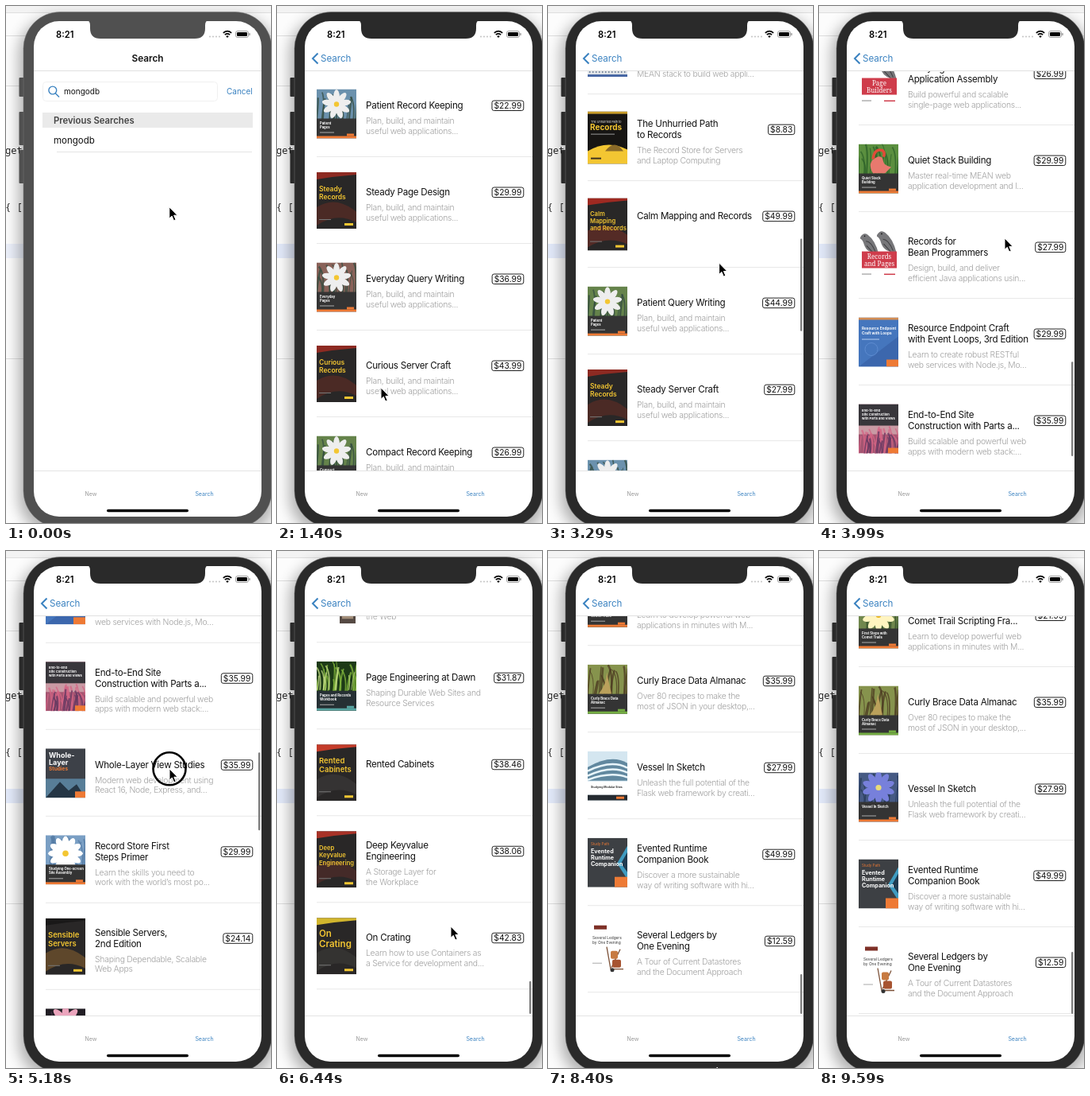
These frames come from a looping animation (334x650 px, 9660 ms). An HTML page:

```html
<!DOCTYPE html>
<html lang="en">
<head>
<meta charset="utf-8">
<title>Book search</title>
<style>
html, body { margin: 0; width: 100%; height: 100%; overflow: hidden; background: #fff; }
body > svg { display: block; width: 100vw; height: 100vh; }
text { font-family: Inter, "Open Sans", sans-serif; white-space: pre; }
.mono { font-family: "Noto Sans Mono", "DejaVu Sans Mono", monospace; }
.title { font-size: 11.6px; letter-spacing: -.26px; fill: #111; }
.sub { font-size: 10.4px; letter-spacing: -.25px; font-weight: 300; fill: #a0a0a0; }
</style>
</head>
<body>
<svg id="stage" viewBox="0 0 334 650"></svg>
<script>
const LOOP = 9660, ROW = 109, BLUE = '#3a82c0', GOLD = '#f3c632', ORANGE = '#ee7a35';

const rnd = k => { const v = Math.sin(k * 12.9898) * 43758.5453; return v - Math.floor(v); };
const text = (x, y, s, size, fill, more = '') =>
  `<text x="${x}" y="${y}" font-size="${size}" fill="${fill}" ${more}>${s}</text>`;
const rect = (x, y, w, h, fill, more = '') =>
  `<rect x="${x}" y="${y}" width="${w}" height="${h}" fill="${fill}" ${more}/>`;
const path = (d, fill, more = '') => `<path d="${d}" fill="${fill}" ${more}/>`;
const oval = (x, y, rx, ry, fill, more = '') =>
  `<ellipse cx="${x}" cy="${y}" rx="${rx}" ry="${ry}" fill="${fill}" ${more}/>`;
const lines = (s, x, y, step, size, fill, more) =>
  s.split('|').map((l, i) => text(x, y + i * step, l, size, fill, more)).join('');
const rule = (x1, x2, y, color) => rect(x1, y, x2 - x1, 1, color);
const bold = 'font-weight="700"';

// Cover artwork, each 50 wide
const box = (h, art) => `<svg x="50" y="${54.5 - h / 2}" width="50" height="${h}">${art}</svg>`;

function blades(seed, color, n, y, h) {
  let out = '';
  for (let i = 0; i < n; i++) {
    const x = rnd(seed + i) * 50, top = y + rnd(seed + i * 3 + 1) * h * .6;
    out += `<path d="M${x} ${y + h}Q${x + 2} ${top + 8} ${x + rnd(seed + i * 7) * 12 - 6} ${top}" ` +
      `stroke="${color}" stroke-width="${1 + rnd(i) * 1.6}" fill="none" opacity=".75"/>`;
  }
  return out;
}

function petals(x, y, r, n, color, core) {
  let out = '';
  for (let i = 0; i < n; i++)
    out += oval(x, y - r * .6, r * .24, r * .55, color, `transform="rotate(${i * 360 / n} ${x} ${y})"`);
  return out + oval(x, y, r * .2, r * .2, core);
}

const photo = (sky, grass, bloom, title, strip = ORANGE, band = '#343434') => box(62,
  rect(0, 0, 50, 62, sky) + blades(title.length, grass, 18, 0, 38) + bloom +
  rect(0, 37, 50, 25, band) + lines(title, 4, 44, 5, 4.2, '#fff', bold) +
  rect(4, 54, 18, 1, '#aaa') + rect(0, 59, 50, 3, strip) + rect(38, 56, 9, 3, strip));

const night = (h, title, size, top = '#8d2a22', glow = '#5a2c24') => box(h,
  rect(0, 0, 50, h, '#292727') +
  path(`M0 ${h * .62}Q24 ${h * .4} 50 ${h * .7}V${h - 8}Q25 ${h * .7} 0 ${h - 4}Z`, glow, 'opacity=".7"') +
  path('M0 0H50V3Q24 5 0 9Z', top) +
  lines(title, 3, h * .34, size + 1.5, size, GOLD, 'font-weight="600"') +
  rect(3, h - 12, 15, 1, '#777') + rect(35, h - 7, 11, 3, GOLD));

const bird = (x, y, s) => `<g transform="translate(${x} ${y}) scale(${s})" fill="#77777a">` +
  path('M0 3Q5-6 12-1Q24 8 29 29Q10 28 6 14Q4 7 0 5Z', '#77777a') +
  path('M9 9Q17 9 24 26M10 16L20 27M16 28V34M21 28V34', 'none', 'stroke="#3f3f42" stroke-width="1.3"') +
  oval(7, 1, 1, 1, '#111') + '</g>';

const animal = (title, two) => box(66, rect(0, 0, 50, 66, '#fff') + bird(23, 5, .85) +
  (two ? bird(2, 8, .8) : '') + rect(4, 28, 44, 21, '#cf3c4b') +
  lines(title, 26, 37, 9, 8, '#fff', 'text-anchor="middle" style="font-family:\'Noto Serif\',serif"') +
  rect(4, 56, 12, 1, '#888') + rect(32, 56, 14, 1.5, '#cf3c4b'));

const covers = {
  5: photo('#3b3330', '#70472a', '', 'Site|Workbench', ORANGE, '#2c2725'),
  6: night(71, 'Sensible|Records', 9, '#6d3028', '#6b4638'),
  7: box(65, rect(0, 0, 50, 65, '#f8f8f8') + rect(0, 0, 50, 12, '#596fae') + rect(4, 5, 24, 1.5, '#c8d2ee') +
    lines('Layers, Modules|and Pages for|Site Building', 4, 29, 6, 5.2, '#445') +
    rect(0, 44, 50, 21, '#8f9fb6') + path('M0 54L16 48H34L50 54V62H0Z', '#e0e4e8') +
    Array.from({ length: 12 }, (_, i) => rect(2 + i * 4, 54, 1.4, 6, '#77869a')).join('') +
    rect(0, 62, 50, 3, '#4666a4')),
  8: box(66, rect(0, 0, 50, 66, '#171513') + path('M0 50Q25 35 50 48V66H0Z', GOLD) +
    path('M22 50Q34 34 45 50Z', '#8a6a28') + rect(0, 0, 50, 3, '#c99d2a') +
    text(4, 14, 'The Unhurried Path to', 3.7, '#eee') +
    text(3, 23, 'Records', 10, GOLD, bold) + rect(4, 28, 30, 1, '#999') + rect(4, 58, 13, 2, '#3d3320')),
  9: night(66, 'Calm|Mapping|and Records', 7.6, '#9e2921', '#672d26'),
  14: animal('Page|Builders'),
  15: photo('#5b8f3f', '#2d6129',
    path('M18 37Q10 23 22 17Q30 13 31 22Q32 27 41 29L33 37Z', '#e8796e') +
    path('M18 19Q20 5 30 8Q34 12 31 16', 'none', 'stroke="#e14b38" stroke-width="3.5"'), 'Quiet Stack|Building'),
  16: animal('Records|and Pages', true),
  17: box(62, rect(0, 0, 50, 62, '#4576bd') + path('M0 62L50 24V62Z', '#3c67ad') +
    rect(0, 0, 50, 3, '#d48e55') + lines('Resource Endpoint|Craft with Loops', 4, 15, 6, 4.7, '#fff', bold) +
    rect(4, 27, 22, 1, '#b5cdf0') + oval(16, 40, 8, 8, 'none', 'stroke="#5d8bd0"') + rect(35, 53, 15, 9, ORANGE)),
  18: box(62, rect(0, 0, 50, 62, '#a45571') + rect(0, 26, 50, 12, '#c99aa4') +
    blades(8, '#d56585', 28, 28, 34) + blades(31, '#633960', 18, 33, 29) + rect(0, 0, 50, 27, '#38363b') +
    lines('End-to-End|Site Construction|with Parts and Views', 4, 9, 5, 4.1, '#fff', bold) + rect(37, 55, 13, 7, ORANGE)),
  19: box(62, rect(0, 0, 50, 62, '#3d4148') + lines('Whole-|Layer', 4, 12, 9, 9, '#fff', bold) +
    text(4, 28, 'Studies', 6.5, ORANGE, bold) + rect(0, 38, 50, 24, '#587e98') +
    path('M0 62L18 42L29 53L39 45L50 62Z', '#253645') + rect(37, 54, 13, 8, ORANGE)),
  20: photo('#7a9fc4', '#547ba5', petals(25, 23, 19, 12, '#fff', GOLD), 'Studying One-screen|Site Assembly'),
  21: night(71, 'Sensible|Servers', 9.5, '#191818', '#75552d'),
  22: photo('#211d24', '#493047', petals(25, 16, 18, 8, '#eba5bd', '#dc567d'), 'Record|Primer'),
  25: `<svg x="79" y="36" width="20" height="49">${rect(0, 0, 20, 49, '#554943') + rect(3, 39, 14, 4, '#a28e79')}</svg>`,
  26: photo('#1d3a17', '#83b83d', blades(55, '#c3dd85', 9, 4, 32), 'Pages and Records|Workbook', '#58a6a3', '#263034'),
  27: night(71, 'Rented|Cabinets', 9.5, '#c43c2a', '#3b3838'),
  28: night(71, 'Deep|Keyvalue|Engineering', 7.6, '#a83227', '#512c28'),
  29: night(71, 'On|Crating', 11.5, '#d1b52d', '#393835'),
  35: photo('#70874d', '#3c5730', petals(25, 20, 18, 10, '#fff4c0', '#eab622'), 'First Steps with|Comet Trails'),
  36: photo('#86934d', '#4c3b22', path('M14 37Q24 24 24 10L30 37Z', '#baa05b'), 'Curly Brace Data|Almanac', '#74ae43'),
  37: `<g id="stale">${box(62, rect(0, 0, 50, 62, '#d4e6f0') + path('M0 20Q30 3 50 15V37H0Z', '#61889f') +
    path('M0 25Q30 10 50 21M0 31Q30 17 50 27M0 36Q30 25 50 33', 'none', 'stroke="#e8f5fb" stroke-width="2.5"') +
    rect(0, 38, 50, 17, '#fff') + text(4, 46, 'Studying Modular Sites', 3.5, '#333', bold) +
    rect(0, 55, 50, 7, '#252b31') + rect(36, 57, 10, 3, ORANGE))}</g><g id="fresh">` +
    photo('#465a84', '#263956', petals(25, 19, 18, 10, '#7780db', '#e9db79'), 'Vessel In Sketch') + '</g>',
  38: box(62, rect(0, 0, 50, 62, '#3d4044') + path('M50 10L37 32L50 52Z', '#3e9bc0') + path('M50 18L42 32L50 43Z', '#203b50') +
    text(4, 9, 'Study Path', 4.5, ORANGE) + lines('Evented|Runtime|Companion', 4, 19, 8, 7.2, '#fff', bold) +
    rect(34, 49, 16, 13, ORANGE)),
  39: box(62, rect(0, 0, 50, 62, '#fff') + rect(8, 1, 16, 5, '#7e3027') +
    lines('Several Ledgers|by One Evening', 6, 18, 6, 4.8, '#333') + path('M24 28L29 56H45M30 54L41 31', 'none', 'stroke="#7b5037" stroke-width="1.3"') +
    rect(29, 33, 9, 10, '#c77a41', 'rx="2"') + rect(31, 44, 11, 10, '#a75431', 'rx="2"') + oval(31, 57, 2.5, 2.5, '#333') + rect(6, 48, 12, 1, '#aaa'))
};

const books = {
  5: ['Site Assembly|Workbench', 'Build an interactive and full-|featured web application from...', '39.99'],
  6: ['Document Almanac,|2nd Edition', 'Harness the latest features of|MongoDB 3 with this collectio...', '35.99'],
  7: ['Layered Servers and|Modular Browser Assembly,...', 'The definitive guide to using the|MEAN stack to build web appli...', '33.16'],
  8: ['The Unhurried Path|to Records', 'The Record Store for Servers|and Laptop Computing', '8.83'],
  9: ['Calm Mapping and Records', '', '49.99'],
  14: ['Studying One-screen Site|Application Assembly', 'Build powerful and scalable|single-page web applications...', '26.99'],
  15: ['Quiet Stack Building', 'Master real-time MEAN web|application development and l...', '29.99'],
  16: ['Records for|Bean Programmers', 'Design, build, and deliver|efficient Java applications usin...', '27.99'],
  17: ['Resource Endpoint Craft|with Event Loops, 3rd Edition', 'Learn to create robust RESTful|web services with Node.js, Mo...', '29.99'],
  18: ['End-to-End Site|Construction with Parts a...', 'Build scalable and powerful web|apps with modern web stack:...', '35.99'],
  19: ['Whole-Layer View Studies', 'Modern web development using|React 16, Node, Express, and...', '35.99'],
  20: ['Record Store First|Steps Primer', 'Learn the skills you need to|work with the world’s most po...', '29.99'],
  21: ['Sensible Servers,|2nd Edition', 'Shaping Dependable, Scalable|Web Apps', '24.14'],
  25: ['Stored Pages', 'Keeping useful records for|the Web', '28.41'],
  26: ['Page Engineering at Dawn', 'Shaping Durable Web Sites and|Resource Services', '31.87'],
  27: ['Rented Cabinets', '', '38.46'],
  28: ['Deep Keyvalue|Engineering', 'A Storage Layer for|the Workplace', '38.06'],
  29: ['On Crating', 'Learn how to use Containers as|a Service for development and...', '42.83'],
  35: ['First Steps with|Comet Trail Scripting Fra...', 'Learn to develop powerful web|applications in minutes with M...', '21.99'],
  36: ['Curly Brace Data Almanac', 'Over 80 recipes to make the|most of JSON in your desktop,...', '35.99'],
  37: ['Vessel In Sketch', 'Unleash the full potential of the|Flask web framework by creati...', '27.99'],
  38: ['Evented Runtime|Companion Book', 'Discover a more sustainable|way of writing software with hi...', '49.99'],
  39: ['Several Ledgers by|One Evening', 'A Tour of Current Datastores|and the Document Approach', '12.59']
};

const moods = ['Patient', 'Steady', 'Everyday', 'Curious', 'Compact'];
const topics = ['Record Keeping', 'Page Design', 'Query Writing', 'Server Craft'];
const filler = i => [`${moods[i % 5]} ${topics[i % 4]}`, 'Plan, build, and maintain|useful web applications...',
  `${22 + i * 7 % 24}.99`];
const fillCover = i => i % 2 ? night(71, `${moods[i % 5]}|Records`, 8.5)
  : photo(['#6b91ad', '#65834b', '#8a6259'][i % 3], '#344c40', petals(25, 19, 16, 9, '#eee', GOLD), `${moods[i % 5]}|Pages`);

function row(i) {
  const [title, sub, price] = books[i] || filler(i);
  const two = title.includes('|');
  return `<g class="row" transform="translate(0 ${i * ROW})"><g class="cover">${covers[i] || fillCover(i)}</g>` +
    lines(title, 112, two ? 41 : 48, 14, 11.6, '#111', 'class="title"') +
    lines(sub, 112, two ? 74 : 67, 12.5, 10.4, '#a0a0a0', 'class="sub"') +
    `<g class="price">${rect(0, 38, 0, 12.5, 'none', 'rx="2.5" stroke="#222"') +
      text(308.3, 48, '$' + price, 10.3, '#111', 'text-anchor="end"')}</g>` + rule(50, 322, 108, '#e8e8e8') + '</g>';
}

const desk = rect(0, 0, 334, 650, '#fcfcfc') + rect(0, 0, 334, 8, '#f3f3f3') +
  [8, 37, 100, 443].map(y => rule(0, 334, y, '#dedede')).join('') +
  rect(0, 299, 30, 18, '#e3eafa', 'id="mark"') +
  text(-1, 186, 'get', 12, '#222', 'class="mono"') + text(-1, 257, '{ [', 12, '#222', 'class="mono"') +
  rect(16, 14, 324, 650, '#000', 'rx="46" opacity=".3" filter="url(#soft)"');

const phone = `<g id="body">${[[90, 24], [133, 42], [181, 42]].map(([y, h]) => rect(16.5, y, 7, h, 'inherit', 'rx="1"')).join('')}
  ${rect(22, 7.5, 313, 648, 'inherit', 'rx="46" stroke="#777" stroke-opacity=".5"')}</g>`.replace(/fill="inherit"/g, '');

const home = rect(35, 82, 287, 502, '#fff') +
  rect(46.5, 95.5, 220, 24, '#fff', 'rx="4" stroke="#f0f0f0"') +
  `<g fill="none" stroke="${BLUE}" stroke-width="1.4"><circle cx="58.8" cy="106" r="4.9"/><path d="M62.3 109.8L67 114.5"/></g>` +
  text(73, 111, 'mongodb', 10, '#111') + text(278, 111, 'Cancel', 10, BLUE) +
  rect(46, 134, 265, 19, '#eaeaea') + text(60, 148, 'Previous Searches', 11.3, '#444', 'font-weight="600"') +
  text(60, 173, 'mongodb', 11.5, '#111') + rule(64, 310, 183, '#e4e4e4');

const status = text(63, 40, '8:21', 11.2, '#000', 'font-weight="600"') +
  [257, 261, 265, 269].map(x => oval(x, 38.5, 1.1, 1.1, '#c8c8c8')).join('') +
  '<g fill="none" stroke="#000" stroke-width="1.7"><path d="M273.8 33.8Q279 29.5 284.2 33.8M275.8 36.2Q279 33.7 282.2 36.2"/></g>' +
  path('M277.2 38Q279 36.7 280.8 38L279 40Z', '#000') +
  rect(289.5, 31.5, 16, 8, 'none', 'rx="2.4" stroke="#888" stroke-width=".8"') +
  rect(291, 33, 13, 5, '#000', 'rx="1.2"') + rect(306.4, 34, 1.2, 3, '#888', 'rx=".6"');

const stage = document.getElementById('stage');
stage.innerHTML = `<defs>
  <filter id="soft" x="-20%" y="-20%" width="140%" height="140%"><feGaussianBlur stdDeviation="9"/></filter>
  <clipPath id="screen"><rect x="35" y="19" width="287" height="623" rx="32"/></clipPath>
  <clipPath id="view"><rect x="35" y="82" width="287" height="502"/></clipPath></defs>
  ${desk}${phone}
  <g clip-path="url(#screen)">${rect(35, 19, 287, 623, '#fff')}
    <g clip-path="url(#view)"><g id="home">${home}</g>
      <g id="results">${rect(35, 82, 287, 502, '#fff')}<g id="list">${Array.from({ length: 40 }, (_, i) => row(i)).join('')}</g></g>
      ${rect(318, 83, 2.4, 100, '#808080', 'rx="1.2" id="thumb"')}</g>
    ${rule(35, 322, 81, '#e0e0e0')}${rule(35, 322, 584, '#e4e4e4')}
    <g id="heading">${text(178.5, 70, 'Search', 11.8, '#111', 'font-weight="600" text-anchor="middle"')}</g>
    <g id="back">${path('M51.5 59.5L45 66L51.5 72.5', 'none', `stroke="${BLUE}" stroke-width="2"`)}<g id="label">${text(55, 70, 'Search', 11.6, BLUE)}</g></g>
    ${text(107, 616, 'New', 7, '#999', 'text-anchor="middle"')}${text(250, 616, 'Search', 7, BLUE, 'text-anchor="middle"')}
    ${rect(127, 632.7, 103, 3.6, '#000', 'rx="1.8"')}${status}</g>
  ${path('M101 18q5 0 5 6v4q0 13 13 13h119q13 0 13-13v-4q0-6 5-6z', '', 'id="notch"').replace('fill=""', '')}
  <g id="cursor"><circle id="ring" r="20.5" fill="none" stroke="#000" stroke-width="2.6"/>
    ${path('M0 0V14.3L3.3 11.3L5.7 17L8.2 15.9L5.8 10.4H10.2Z', '#000', 'stroke="#fff" stroke-width="1"')}</g>`;

const el = id => document.getElementById(id);
const [body, notch, mark, homeView, results, list, thumb, heading, back, label, cursor, ring, stale, fresh] =
  ['body', 'notch', 'mark', 'home', 'results', 'list', 'thumb', 'heading', 'back', 'label', 'cursor', 'ring', 'stale', 'fresh'].map(el);
const rows = [...document.querySelectorAll('.row')];
const art = rows.map(r => r.querySelector('.cover'));

function fitPrices() {
  document.querySelectorAll('.price').forEach(p => {
    const w = p.lastChild.getComputedTextLength() + 5;
    p.firstChild.setAttribute('width', w);
    p.firstChild.setAttribute('x', 310.8 - w);
  });
}
fitPrices();

const clamp = v => Math.max(0, Math.min(1, v));
const out = p => 1 - (1 - p) ** 2;

// Values at t from [time, ...values] stops; ease bends each span
function track(stops, t, ease = () => p => p) {
  let i = stops.findIndex(s => s[0] > t);
  if (i === 0) return stops[0].slice(1);
  if (i < 0) return stops[stops.length - 1].slice(1);
  const a = stops[i - 1], b = stops[i], p = ease(b[0])((t - a[0]) / (b[0] - a[0]));
  return a.slice(1).map((v, k) => v + (b[k + 1] - v) * p);
}

const presses = [[420, 560], [1610, 1820], [3050, 3270], [3600, 3790], [5000, 5250], [6950, 7150], [7700, 7880], [8950, 9130]];
const scroll = [[1610, 0], [1820, 190], [2590, 612], [2870, 587], [3050, 587], [3270, 800], [3560, 1100], [3600, 1105],
  [3790, 1340], [4300, 1697], [4550, 1677], [5000, 1677], [5180, 1926], [5250, 2010], [6440, 2800], [6700, 2767],
  [6950, 2767], [7150, 2990], [7700, 3360], [7880, 3590], [8400, 3886], [8680, 3857], [8950, 3857], [9130, 3925], [9590, 3859]];
const bar = [[1610, 83, 230], [2590, 377, 205], [2870, 352, 230], [2950, 217, 115], [3990, 447, 119], [4300, 487, 95],
  [4550, 467, 115], [4620, 232, 98], [5180, 253, 98], [6440, 541, 41], [6700, 505, 77], [6780, 400, 78],
  [8400, 532, 50], [8680, 504, 78], [8950, 504, 78], [9130, 548, 34], [9590, 504, 78]];
const pointer = [[0, 206, 253], [420, 131, 170], [1050, 131, 170], [1400, 131, 480], [1610, 131, 480], [1820, 150, 290],
  [2590, 197, 443], [3050, 215, 520], [3270, 215, 307], [3600, 225, 560], [3790, 232, 325], [3990, 234, 292],
  [4250, 234, 290], [5000, 207, 524], [5180, 206, 275], [5250, 206, 191], [6440, 219, 472], [6950, 219, 500],
  [7150, 215, 277], [7700, 215, 520], [7880, 213, 290], [8400, 213, 649], [8600, 213, 670], [8850, 213, 590],
  [8950, 213, 570], [9130, 213, 502], [9430, 213, 670]];
const dragging = end => presses.some(([a, b]) => end > a && end <= b);
const shift = (node, x, y = 0) => node.setAttribute('transform', `translate(${x} ${y})`);

function draw(t) {
  const active = t >= 420, frame = active ? '#2a2a2a' : '#505050';
  body.setAttribute('fill', frame);
  notch.setAttribute('fill', frame);
  mark.setAttribute('opacity', active ? 1 : .6);

  const push = 1 - (1 - clamp((t - 560) / 450)) ** 3;
  shift(homeView, -86 * push);
  shift(results, 287 * (1 - push));
  shift(heading, -105 * push);
  heading.setAttribute('opacity', clamp(1 - push * 2));
  back.setAttribute('opacity', clamp(push * 2 - 1));
  shift(label, 105 * (1 - push));

  const [s] = track(scroll, t, end => dragging(end) ? p => p : out);
  shift(list, 0, 81 - s);
  const count = t < 2950 ? 10 : t < 4560 ? 20 : t < 6750 ? 30 : 40;
  rows.forEach((r, i) => {
    const y = i * ROW - s;
    r.style.display = i < count && y > -ROW && y < 503 ? '' : 'none';
    art[i].style.display = i > 4 || t >= 1050 + i * 70 ? '' : 'none';
  });
  stale.style.display = t < 8900 ? '' : 'none';
  fresh.style.display = t < 8900 ? 'none' : '';

  const [top, length] = track(bar, t);
  thumb.setAttribute('y', top);
  thumb.setAttribute('height', length);
  thumb.setAttribute('opacity', t < 1610 ? 0 : 1);

  shift(cursor, ...track(pointer, t));
  ring.style.display = presses.some(([a, b]) => t >= a && t < b) ? '' : 'none';
}

const start = performance.now();
function tick(now) {
  draw(Math.max(0, now - start) % LOOP);
  requestAnimationFrame(tick);
}
draw(0);
fitPrices();
requestAnimationFrame(tick);
</script>
</body>
</html>
```
